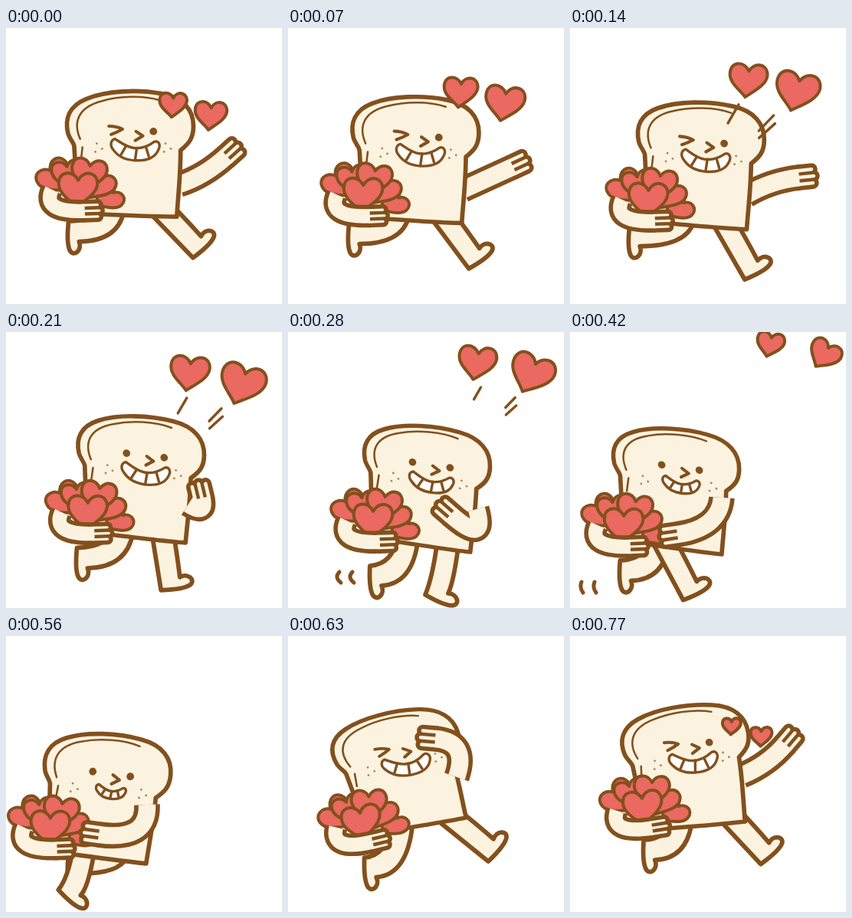
Animation, 360 px wide and 360 px high, one loop 0.84 s. Source, as an HTML page:

```html
<!DOCTYPE html>
<html lang="en">
<head>
<meta charset="utf-8">
<title>Toast with hearts</title>
<style>
html, body { margin: 0; width: 100%; height: 100%; overflow: hidden; background: #fff; }
svg { display: block; width: 100vw; height: 100vh; }
.line { fill: none; stroke: #83501d; stroke-width: 5; stroke-linecap: round; stroke-linejoin: round; }
.skin { fill: #fbf3e0; stroke-width: 5.8; }
.heart { fill: #ea6960; stroke-width: 4; }
.fine { stroke-width: 2.6; }
.thin { stroke-width: 3.4; }
.mid { stroke-width: 4.2; }
.ink { fill: #83501d; }
.dot { fill: #a98a63; }
.limb { fill: none; stroke: #83501d; }
.limb .flesh { stroke: #fbf3e0; }
.limb .finger { stroke-linecap: round; }
#love, #smile path { vector-effect: non-scaling-stroke; }
</style>
</head>
<body>
<svg viewBox="0 0 360 360">
  <defs>
    <path id="love" d="M-2 21C-8 13-23 6-23-7C-23-22-6-23 0-11C5-23 22-23 23-8C23 4 8 13-2 21Z"/>
  </defs>
  <g id="legs">
    <path id="rightLeg" class="line skin"/>
    <path id="leftLeg" class="line skin"/>
  </g>
  <g id="body">
    <path class="line skin" d="M92 241L91 200L88 152C87 147 82 143 80 136C75 116 82 99 104 90C130 79 172 77 204 83C232 88 246 104 246 126C246 142 240 149 229 158C229 190 226 215 224 246C190 246 150 244 92 241Z"/>
    <path class="line fine" d="M96 143C86 120 94 101 124 93C148 86 180 85 202 92M99 154L97 172"/>
    <g id="freckles" class="dot"></g>
    <path class="line mid" d="M170 133L179 139L169 145"/>
    <path id="wink" class="line mid" d="M134 126Q144 126 152 130Q145 134 137 137"/>
    <circle id="leftEye" class="ink" cx="143" cy="131" r="5"/>
    <circle id="rightEye" class="ink" cx="193" cy="133" r="5"/>
    <g id="smile">
      <path class="line thin" style="fill:#fff" d="M-27-11C-33-9-34-2-29 4C-22 14-10 18 2 18C16 18 27 13 31 2C34-5 30-10 25-8C16-1 6 2-2 1C-12 0-19-6-27-11Z"/>
      <path class="line thin" d="M-12-2L-19 11M2 1L0 18M14-1L18 12"/>
    </g>
  </g>
  <g id="flying">
    <use href="#love" class="line heart"/>
    <use href="#love" class="line heart"/>
  </g>
  <path id="sparks" class="line thin"/>
  <path id="dust" class="line"/>
  <g id="bouquet">
    <g id="pile"></g>
    <g id="holdArm" class="limb"></g>
  </g>
  <g id="arm" class="limb"></g>
</svg>
<script>
const $ = id => document.getElementById(id);
const STEP = 70, STEPS = 12;
const EDGE = 5.6;

// body: x, y, tilt, lean, height; arm: shoulder, elbow, wrist;
// feet: left, right; hip: right hip on the slice; sag: drop of the bouquet
const wave   = { body: [79, 127, 0, 0, .985],        arm: [226, 204, 258, 194, 288, 167], feet: [82, 266, 254, 290],  hip: [203], sag: [0] };
const reach  = { body: [88, 138, 2.4, -.01, .98],    arm: [230, 218, 262, 199, 299, 195], feet: [78, 272, 240, 321],  hip: [193], sag: [2] };
const giggle = { body: [99, 157, 6.2, -.035, .945],  arm: [246, 231, 260, 280, 212, 238], feet: [108, 319, 192, 348], hip: [194], sag: [7] };
const gather = { body: [56, 161, 5.8, -.01, .945],   arm: [198, 216, 195, 256, 140, 264], feet: [66, 312, 160, 343],  hip: [147], sag: [9] };
const hug    = { body: [50, 165, 5.2, -.086, .98],   arm: [184, 220, 186, 268, 121, 259], feet: [79, 340, 82, 297],   hip: [184], sag: [0] };
const kiss   = { body: [59, 158, -11.4, .267, .89],  arm: [220, 184, 236, 138, 192, 134], feet: [101, 303, 270, 283], hip: [201], sag: [12] };
const blow   = { body: [68, 145, -6.9, .145, .947],  arm: [224, 182, 258, 168, 281, 141], feet: [97, 280, 259, 288],  hip: [206], sag: [0] };

// one entry per step; a pair is halfway between two poses
const steps = [
  [wave], [wave, reach], [reach], [reach, giggle], [giggle], [giggle, gather],
  [gather], [gather, hug], [hug], [kiss], [kiss, blow], [blow]
];

function pose([a, b = a]) {
  const out = {};
  for (const key in a) out[key] = a[key].map((v, i) => (v + b[key][i]) / 2);
  return out;
}

const mix = (a, b, t) => a + (b - a) * t;
const clamp = v => Math.max(0, Math.min(1, v));
const rad = deg => deg * Math.PI / 180;
const place = (x, y, turn, sx = 1, sy = sx) =>
  `translate(${x} ${y}) rotate(${turn}) scale(${sx} ${sy})`;
const show = (node, on) => { node.style.display = on ? '' : 'none'; };

function unit([ax, ay], [bx, by]) {
  const len = Math.hypot(bx - ax, by - ay) || 1;
  return [(bx - ax) / len, (by - ay) / len];
}

// a slice drawn around its left bump, tilted and sheared
function slice([x, y, tilt, lean, tall]) {
  const a = .985 * Math.cos(rad(tilt)), b = Math.sin(rad(tilt));
  return {
    matrix: `translate(${x} ${y}) matrix(${a} ${b} ${lean} ${tall} 0 0) translate(-78 -125)`,
    at: (u, v) => [
      x + a * (u - 78) + lean * (v - 125),
      y + b * (u - 78) + tall * (v - 125)
    ]
  };
}

// the knee bends more the further the foot is kicked back
function leg(hip, foot, half = 14) {
  const kick = clamp((hip[0] - foot[0]) / 50);
  const knee = [mix(hip[0], foot[0], .5 - .4 * kick), mix(hip[1], foot[1], .5 + .45 * kick)];
  const e = unit(hip, knee), d = unit(knee, foot);
  const m = [e[1], -e[0]], n = [d[1], -d[0]];
  const miter = half / (1 + m[0] * n[0] + m[1] * n[1]);
  const hipAt = s => [hip[0] + s * half * m[0], hip[1] + s * half * m[1]];
  const kneeAt = s => [knee[0] + s * miter * (m[0] + n[0]), knee[1] + s * miter * (m[1] + n[1])];
  const sole = (across, down) =>
    [foot[0] + across * n[0] + down * d[0], foot[1] + across * n[1] + down * d[1]];
  return `M${hipAt(-1)}Q${kneeAt(-1)} ${sole(-half, 0)}` +
    `Q${sole(16, 4)} ${sole(25, -1)}C${sole(33, -6)} ${sole(24, -17)} ${sole(half - 1, -13)}` +
    `Q${kneeAt(1)} ${hipAt(1)}`;
}

function limb(group, [sx, sy, ex, ey, wx, wy], width) {
  const [dx, dy] = unit([ex, ey], [wx, wy]);
  const thick = (width - 14.5) / 3, gap = thick + 4.5;
  const sleeve = `M${sx} ${sy}Q${ex} ${ey} ${wx} ${wy}`;
  let hand = '';
  for (let i = -1; i <= 1; i++) {
    const x = wx - i * gap * dy, y = wy + i * gap * dx;
    const reach = 19 - 2 * Math.abs(i);
    hand += `M${x - dx} ${y - dy}L${x + dx * reach} ${y + dy * reach}`;
  }
  const path = (d, w, name) => `<path class="${name}" d="${d}" stroke-width="${w}"/>`;
  group.innerHTML =
    path(sleeve, width + EDGE, '') + path(hand, thick + 2 * EDGE, 'finger') +
    path(sleeve, width - EDGE, 'flesh') + path(hand, thick, 'flesh finger');
}

// two hearts float up, swell and shrink again
function floatHearts(k) {
  const swell = 1.28 - .042 * (k - 3) ** 2;
  const [near, far] = $('flying').children;
  near.setAttribute('transform',
    place(218 + 7.2 * k, 100 - 17 * k + .5 * k * k, 2 + 1.6 * k, swell * .86));
  far.setAttribute('transform',
    place(267 + 16.5 * k - .95 * k * k, 114 - 16.5 * k + .4 * k * k, 4 + 4.5 * k, swell));
}

function sparks(s) {
  const half = 14 - 5 * s;
  return [[213, 112, 120], [256, 124, 134], [257, 134, 138]].map(([x, y, turn]) => {
    const dx = half * Math.cos(rad(turn)), dy = half * Math.sin(rad(turn));
    const cx = x + 34 * s, cy = y - 32 * s;
    return `M${cx - dx} ${cy - dy}L${cx + dx} ${cy + dy}`;
  }).join('');
}

function dust(s) {
  const x = 67 - 26 * s, y = 313 + 6.5 * s;
  return [0, 17].map(gap => `M${x + gap} ${y}q${-7 + 2 * s} 7 2 14`).join('');
}

let specks = '';
for (const x of [118, 209]) {
  for (const [dx, dy] of [[0, 0], [7, 7], [-2, 11]]) {
    specks += `<circle cx="${x + dx}" cy="${149 + dy}" r="1.5"/>`;
  }
}
$('freckles').innerHTML = specks;

$('pile').innerHTML = [
  [39, 12, 50, .84], [-29, -14, -38, 1], [-13, -18, -8, .9],
  [26, -4, 28, .94], [14, -18, 10, 1], [0, 2, 2, 1.1]
].map(([x, y, turn, size]) =>
  `<use href="#love" class="line heart" transform="${place(x, y, turn, size)}"/>`).join('');
limb($('holdArm'), [-34, 2, -48, 32, 9, 30], 24);

const svg = document.querySelector('svg');
let last = -1;

function draw(n) {
  const p = pose(steps[n]);
  const { matrix, at } = slice(p.body);
  $('body').setAttribute('transform', matrix);

  const [lx, ly, rx, ry] = p.feet;
  $('leftLeg').setAttribute('d', leg(at(140, 236), [lx, ly]));
  $('rightLeg').setAttribute('d', leg(at(p.hip[0], 236), [rx, ry]));
  $('legs').append(ly > ry ? $('leftLeg') : $('rightLeg'));

  const [bx, by] = at(93, 208);
  $('bouquet').setAttribute('transform', place(bx, by + p.sag[0], Math.min(0, p.body[2])));

  const winking = n < 3 || n > 8;
  const grin = winking ? 1 : Math.min(1, 1.22 - .075 * n);
  $('smile').setAttribute('transform', place(169, 154, 1, grin, grin * .97));
  show($('wink'), winking);
  show($('leftEye'), !winking);
  show($('rightEye'), n !== 9);

  const k = n === STEPS - 1 ? -1 : n;
  show($('flying'), k < 7);
  floatHearts(k);
  $('sparks').setAttribute('d', n >= 2 && n <= 4 ? sparks((n - 2) / 2) : '');
  $('dust').setAttribute('d', n >= 4 && n <= 6 ? dust(n - 4) : '');

  // an outstretched arm sits behind the slice
  limb($('arm'), p.arm, 28);
  svg.insertBefore($('arm'), k < 3 ? $('body') : null);
}

function tick() {
  const n = Math.floor(performance.now() / STEP) % STEPS;
  if (n !== last) draw(last = n);
  requestAnimationFrame(tick);
}
tick();
</script>
</body>
</html>
```
